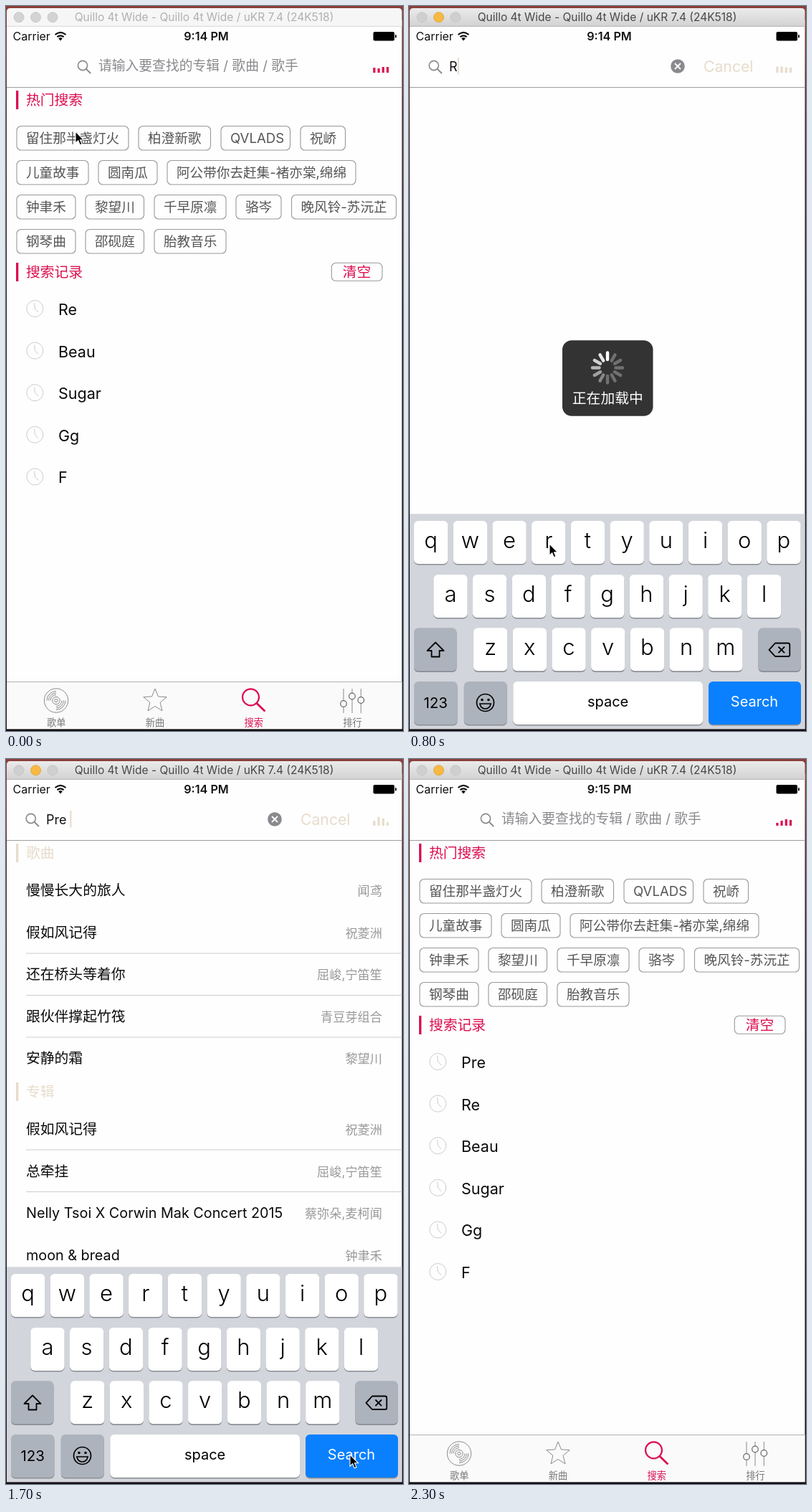
Write an HTML page that moves like this. It is 554x1011 px and loops after 2400 ms.

```html
<!DOCTYPE html>
<html lang="zh-CN">
<head>
<meta charset="utf-8">
<title>Music search</title>
<style>
  html, body { margin: 0; width: 100%; height: 100%; overflow: hidden; background: #141013; }
  svg { display: block; width: 554px; height: 1011px; }
  text { font-family: Inter, "Noto Sans CJK SC", "Noto Sans CJK JP", sans-serif; }
</style>
</head>
<body>
<svg id="stage" viewBox="0 0 554 1011"></svg>
<script>
const STEP = 100, STEPS = 24;
const PINK = '#dc0f50', BEIGE = '#e7dccb', OLIVE = '#d1c634';

const homeTags = [
  [[15, 156, '留住那半盏灯火'], [185, 100.5, '柏澄新歌'], [300, 96.5, 'QVLADS'], [411, 62.5, '祝峤']],
  [[15, 100, '儿童故事'], [129, 82, '圆南瓜'], [225, 263, '阿公带你去赶集-褚亦棠,绵绵']],
  [[15, 82, '钟聿禾'], [111, 81.5, '黎望川'], [207, 100, '千早原凛'], [321, 63, '骆岑'], [398.5, 146, '晚风铃-苏沅芷']],
  [[15, 82, '钢琴曲'], [111, 81.5, '邵砚庭'], [207, 100, '胎教音乐']]
];
const history = ['Re', 'Beau', 'Sugar', 'Gg', 'F'];
const resultsR = [
  ['慢慢长大的旅人', '闻鸢'], ['假如风记得', '祝菱洲'], ['还在桥头等着你', '屈峻,宁笛笙'],
  ['跟伙伴撑起竹筏', '青豆芽组合'], ['安静的霜', '黎望川'],
  ['假如风记得', '祝菱洲'], ['总牵挂', '屈峻,宁笛笙'],
  ['Nelly Tsoi X Corwin Mak Concert 2015', '蔡弥朵,麦柯闻'], ['moon &amp; bread', '钟聿禾']
];
const resultsRg = [
  ['好时辰', '穆歌'], ['【序】《栖竹》', '岚歌'], ['一座小城的等候', '戚钧'],
  ['KLMOV', 'OuterVox,Nila(东部海湾)'], ['朝霧に揺れる舟', '凪K,夏野ルリ'],
  ['Kmo', 'Orlanthemic'], ['戚远钢琴小品集', '戚远'], ['好时辰', '穆歌'], ['渐行渐暖', '穆歌']
];
const songs = [
  ['Ferns', 'Drovel', 'Pre'], ['Pale Mint', 'Drovel', 'Pre'], ['Frozen Ladder', 'Drovel', 'Pre'],
  ['The Cupboarder', 'Drovel', 'Pre'], ['Blank Page Calendar', 'Drovel', 'Pre'],
  ['Pre', 'Torbe Anskil', 'Folding Plates'], ['Pre', 'qdv 38', 'Low Ferry'],
  ['Pre', 'Oatmill', 'Quieter Lamp'], ['Serenade To Hollis', 'Plovin', 'Plovin'],
  ['Pre', 'Plovin', 'Pre']
];

// Each entry: step, then values; values in between are interpolated.
const pointerPath = [
  [0, 97, 175], [3, 521, 86], [5, 193, 542], [6, 240, 88], [7, 245, 90], [8, 196, 750], [9, 205, 755],
  [10, 273, 829], [11, 275, 832], [12, 515, 900], [13, 515, 900], [14, 286, 864], [15, 520, 750],
  [16, 195, 750], [17, 480, 970], [18, 150, 88], [19, 453, 83], [20, 440, 110], [21, 30, 86], [22, 28, 88]
];
const barLevels = [
  [0, 7, 6, 8, 8], [3, 7, 7, 6, 7], [5, 6, 11, 10, 6], [10, 10, 7, 6, 8],
  [14, 5, 5, 6, 6], [19, 8, 17, 13, 4], [23, 4, 7, 9, 8]
];
const queries = { 8: 'R', 9: 'R', 10: 'Rg', 11: 'Rg', 12: 'R', 13: 'R', 15: 'P', 16: 'Pr', 17: 'Pre' };

function sample(keys, step) {
  const next = keys.findIndex(k => k[0] >= step);
  if (next < 1) return keys[next < 0 ? keys.length - 1 : 0].slice(1);
  const a = keys[next - 1], b = keys[next], f = (step - a[0]) / (b[0] - a[0]);
  return a.slice(1).map((v, i) => v + (b[i + 1] - v) * f);
}

const text = (x, y, size, fill, content, extra = '') =>
  `<text x="${x}" y="${y}" font-size="${size}" fill="${fill}" ${extra}>${content}</text>`;
const centered = (x, y, size, fill, content, extra = '') =>
  text(x, y, size, fill, content, 'text-anchor="middle" ' + extra);
const rect = (x, y, w, h, fill, extra = '') =>
  `<rect x="${x}" y="${y}" width="${w}" height="${h}" fill="${fill}" ${extra}/>`;
const circle = (x, y, r, fill, extra = '') => `<circle cx="${x}" cy="${y}" r="${r}" fill="${fill}" ${extra}/>`;
const path = (d, stroke, width = 1, extra = '') =>
  `<path d="${d}" fill="none" stroke="${stroke}" stroke-width="${width}" ${extra}/>`;
const hLine = (x, y, color, width = 1) => path(`M${x} ${y}H552.5`, color, width);
const range = (n, fn) => Array.from({ length: n }, (_, i) => fn(i)).join('');

const lens = (x, y) => circle(x, y, 6.6, 'none', 'stroke="#8a8a8e" stroke-width="1.6"') +
  path(`M${x + 4.8} ${y + 4.8}l6.4 6.2`, '#8a8a8e', 1.9);
const header = (y, color, label) => rect(14, y, 3.3, 26, color) + text(28, y + 20, 19.8, color, label);
const caret = (x, color) => rect(x, 72, 2, 23.5, color);
const outline = (x, y, w, h) => rect(x, y, w, h, '#fefefe', 'rx="6" stroke="#999" stroke-width="1.1"');

function chrome(step) {
  const active = step > 1;
  return '<defs>' +
    '<linearGradient id="wall" x2="0" y2="1"><stop stop-color="#8c3f38"/><stop offset=".15" stop-color="#4a2428"/><stop offset=".4" stop-color="#1c1a26"/><stop offset="1" stop-color="#120e12"/></linearGradient>' +
    '<linearGradient id="bar" x2="0" y2="1"><stop stop-color="#ebebeb"/><stop offset="1" stop-color="#d2d2d2"/></linearGradient></defs>' +
    rect(0, 0, 554, 1011, 'url(#wall)') +
    rect(1, 20, 551.5, 988.5, '#fefefe') +
    `<path d="M1 28.5V8q0-5 5-5H547.5q5 0 5 5V28.5Z" fill="${active ? 'url(#bar)' : '#f6f6f6'}"/>` +
    hLine(1, 28.3, active ? '#b5b5b5' : '#d8d8d8') +
    [18, 41.5, 65].map((x, i) => circle(x, 15.7, 7, active && i === 1 ? '#f7b941' : active ? '#cfcfcf' : '#d3d3d3',
      `stroke="${active && i === 1 ? '#dca03a' : '#c2c2c2'}" stroke-width=".8"`)).join('') +
    centered(276.5, 21.3, 15.5, active ? '#474747' : '#b0b0b0', 'Quillo 4t Wide - Quillo 4t Wide / uKR 7.4 (24K518)') +
    text(9.5, 48, 16, '#111', 'Carrier') +
    path('M68.5 40q7.5-6.4 15 0M71.4 43.2q4.6-3.8 9.2 0', '#111', 2.2) +
    '<path d="M73.2 45.2q2.8-2.2 5.6 0L76 48.4Z" fill="#111"/>' +
    centered(279.5, 48, 16.2, '#111', step < 20 ? '9:14 PM' : '9:15 PM', 'font-weight="600"') +
    rect(512.5, 36, 29.5, 12.5, '#000', 'rx="2"') + rect(543, 40, 1.8, 4.5, '#000', 'rx="1"') +
    hLine(1, 113.6, '#999');
}

const equalizer = (step, color) => sample(barLevels, step)
  .map((h, i) => rect(512.3 + i * 6.2, 93 - h, 3.2, h, color)).join('');

const clock = y => circle(40.3, y, 11.5, 'none', 'stroke="#ccc"') + path(`M39.5 ${y - 8}L40.5 ${y}L45 ${y + 5}`, '#ccc');

function tabBar() {
  const gray = '#8a8a8a';
  const star = Array.from({ length: 10 }, (_, i) => {
    const r = i % 2 ? 7.5 : 17, a = i * Math.PI / 5;
    return `${(208 + r * Math.sin(a)).toFixed(1)} ${(969 - r * Math.cos(a)).toFixed(1)}`;
  }).join('L');
  return rect(1, 942, 551.5, 66.5, '#fafafa') + hLine(1, 942.6, '#b2b2b2') +
    [16.7, 5.2, 2.2].map(r => circle(70, 968.5, r, 'none', `stroke="${gray}"`)).join('') +
    [8, 10.5, 13].map(r => path(`M${70 - r} 968.5a${r} ${r} 0 0 1 ${r} ${-r}M${70 + r} 968.5a${r} ${r} 0 0 1 ${-r} ${r}`, gray)).join('') +
    path(`M${star}Z`, gray) +
    circle(341.5, 963.8, 11.5, 'none', `stroke="${PINK}" stroke-width="2.2"`) + path('M349.5 972L361.5 983.5', PINK, 2.8) +
    [[471, 973], [483, 962.5], [495.3, 968]].map(([x, y]) =>
      path(`M${x} 952V${y - 4.3}M${x} ${y + 4.3}V986`, gray) + circle(x, y, 4.3, 'none', 'stroke="#666" stroke-width="1.2"')).join('') +
    ['歌单', '新曲', '搜索', '排行'].map((label, i) =>
      centered(70.3 + i * 137.7, 1003.7, 13.2, i === 2 ? PINK : '#777', label)).join('');
}

function home(step) {
  const items = step > 20 ? ['Pre', ...history] : history;
  return lens(107, 83) + text(129, 90.3, 18.8, '#8a8a8e', '请输入要查找的专辑 / 歌曲 / 歌手') +
    equalizer(step, PINK) + header(118, PINK, '热门搜索') +
    homeTags.map((row, r) => row.map(([x, w, label]) =>
      outline(x, 167.5 + r * 48, w, 33.5) + text(x + 13, 191 + r * 48, 18.6, '#555', label)).join('')).join('') +
    header(358, PINK, '搜索记录') + outline(454.3, 358.3, 70.7, 25) + centered(489.6, 378, 19.8, PINK, '清空') +
    items.map((label, i) => clock(422 + i * 58.6) + text(73, 431 + i * 58.6, 21.5, '#0a0a0a', label)).join('') +
    tabBar();
}

function results(step) {
  const query = queries[step] || '';
  const rows = step < 9 ? [] : step === 10 || step === 11 ? resultsRg : resultsR;
  const baseline = i => i < 5 ? 190.3 + i * 58.5 : 523.3 + (i - 5) * 58.5;
  const clear = circle(375, 84, 9.8, '#8a8a8e') + path('M371 80l8 8M379 80l-8 8', '#fff', 1.8);
  return lens(34.7, 83) + text(56, 90.5, 18, '#111', query) +
    caret(query ? 57 + query.length * 10.8 : 54.5, BEIGE) + (query ? clear : '') +
    text(411, 91.8, 21.2, BEIGE, 'Cancel') + equalizer(step, BEIGE) +
    (rows.length ? header(118, BEIGE, '歌曲') + header(451, BEIGE, '专辑') : '') +
    rows.map(([title, artist], i) => text(28, baseline(i), 19.8, '#0a0a0a', title) +
      text(525, baseline(i), 17.2, '#999', artist, 'text-anchor="end"')).join('') +
    (rows.length ? [271, 329.5, 388, 545, 603.5].map(y => hLine(28, y, '#cdcdd0')).join('') : '') +
    keyboard(!query) + ([8, 14, 15].includes(step) ? loader(step) : '');
}

function loader(step) {
  const spokes = range(12, i => {
    const glow = 0.3 + 0.7 * Math.max(0, 1 - ((12 - i) % 12) / 6);
    return path('M277 493V483.5', '#fff', 4.4,
      `stroke-linecap="round" opacity="${glow}" transform="rotate(${i * 30 + (step - 14) * 60} 277 504.5)"`);
  });
  return rect(214, 466.3, 126.5, 105.4, '#333', 'rx="13"') + spokes + centered(277.3, 554.3, 19.8, '#fff', '正在加载中');
}

function keyboard(upper, dy = 0) {
  const gray = '#adb3bd';
  const key = (x, y, w, fill = '#fff') =>
    rect(x, y + 1.6, w, 60, '#8b8e93', 'rx="6"') + rect(x, y, w, 60, fill, 'rx="6"');
  const letters = [['qwertyuiop', 7, 718], ['asdfghjkl', 34.3, 793], ['zxcvbnm', 90, 867.3]].map(([row, x0, y]) =>
    [...row].map((c, i) => {
      const x = x0 + i * 54.7;
      return key(x, y, 47.3) + (upper ? centered(x + 23.6, y + 41, 28.5, '#000', c.toUpperCase())
        : centered(x + 23.6, y + 38, 31, '#000', c, 'font-weight="300"'));
    }).join('')).join('');
  const arrow = `<path d="M37 887.5L25.5 899H31.5V907.5H42.5V899H48.5Z" fill="${upper ? '#000' : 'none'}" stroke="#000" stroke-width="1.8" stroke-linejoin="round"/>`;
  const face = circle(106.5, 971.5, 12, 'none', 'stroke="#000" stroke-width="1.7"') +
    circle(102, 967.5, 1.8, '#000') + circle(111, 967.5, 1.8, '#000') +
    path('M98.8 973H114.2Q112.5 980 106.5 980T98.8 973Z', '#000', 1.6);
  return `<g transform="translate(0 ${dy})">` + rect(1, 708.3, 551.5, 300.2 - dy, '#d2d5db') + letters +
    key(7, 867.3, 59.5, upper ? '#fff' : gray) + arrow + key(487.3, 867.3, 59.5, gray) +
    path('M502.5 897.8L511 888.5H529Q531.3 888.5 531.3 891V904.7Q531.3 907 529 907H511Z', '#000', 1.8, 'stroke-linejoin="round"') +
    path('M515.5 893.5l8.6 8.6M524.1 893.5l-8.6 8.6', '#000', 1.8) +
    key(7, 942, 60.5, gray) + centered(37.3, 979, 20.5, '#000', '123') + key(76.8, 942, 60, gray) + face +
    key(145.3, 942, 264.7) + centered(277.6, 977.3, 20, '#000', 'space') +
    key(418, 942, 129, upper ? gray : '#0a80fe') + centered(482, 977.3, 20, upper ? '#83878d' : '#fff', 'Search') + '</g>';
}

function songList(step) {
  const editing = step === 19;
  const row = ([title, artist, album], i) => {
    const y = i * 66.6;
    return centered(34.5, 152 + y, 22.5, '#929295', i + 1) + text(88, 145 + y, 21.5, '#727275', title) +
      text(88, 169 + y, 16.5, '#333', `${artist}<tspan dx="19.5">${album}</tspan>`) +
      range(3, d => circle(501 + d * 8, 143.7 + y, 1.8, i === 0 && d ? '#c4c4a8' : OLIVE)) +
      hLine(7, 180.2 + y, '#858585', 1.2);
  };
  return path('M33.5 71.5L20.5 84.5L33.5 97.5', OLIVE, 3.4) + lens(105, 83) + text(127, 90.3, 18, '#8a8a8e', 'Pre') +
    equalizer(step, OLIVE) + songs.map(row).join('') +
    (editing ? caret(125, OLIVE) + text(411, 91.8, 21.2, OLIVE, 'Cancel') + keyboard(true, 1) : '');
}

function pointer(step) {
  if (step > 22) return '';
  const [x, y] = sample(pointerPath, step);
  return `<path transform="translate(${x} ${y})" d="M0 0V16.2L3.7 12.8L6.2 18.8L9 17.6L6.5 11.8H11.5Z" fill="#000" stroke="#fff" stroke-width="1.1"/>`;
}

function draw(step) {
  const scene = step < 7 || step > 21 ? home : step < 18 ? results : songList;
  return chrome(step) + scene(step) + rect(0, 1008.5, 554, 2.5, '#120e12') + pointer(step);
}

const stage = document.getElementById('stage');
let shown = -1;
function tick() {
  const step = Math.floor(performance.now() / STEP) % STEPS;
  if (step !== shown) stage.innerHTML = draw(shown = step);
  requestAnimationFrame(tick);
}
tick();
</script>
</body>
</html>
```
